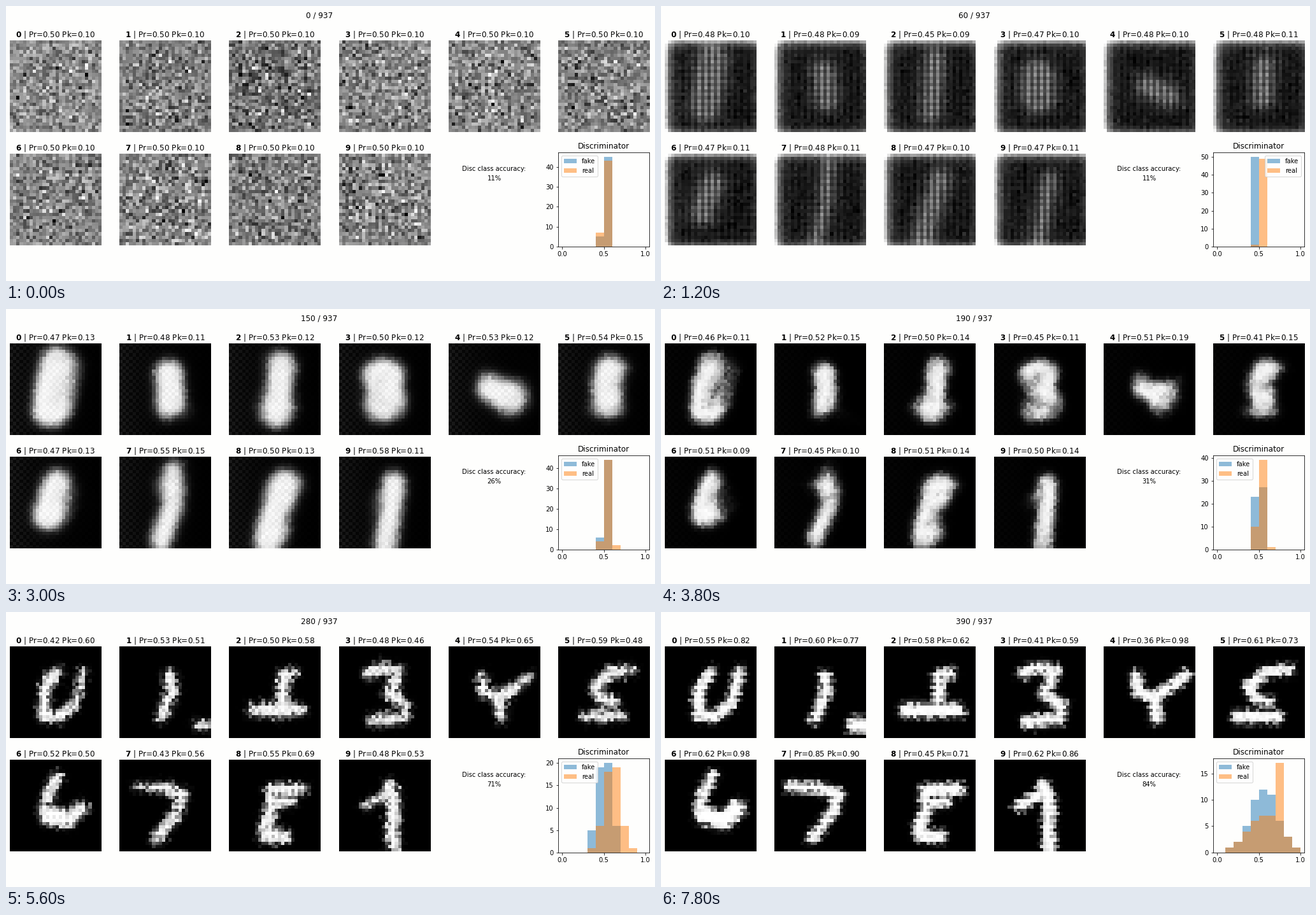
These frames come from a looping animation (1019x432 px, 8 s). A matplotlib script:

```python
import math

import matplotlib.pyplot as plt
import numpy as np
from matplotlib.animation import FuncAnimation

W, H, DPI = 1019, 432, 72
FRAMES, INTERVAL = 40, 200
N = 28
PAPER = "#fefefd"

X, Y = np.meshgrid(np.arange(N) + 0.5, np.arange(N) + 0.5)
ODD_COL, ODD_ROW = X.astype(int) % 2, Y.astype(int) % 2
CHECKER, DOTS = (ODD_COL + ODD_ROW) % 2, ODD_COL * ODD_ROW
RIM = np.minimum.reduce([X, Y, N - X, N - Y])


def bar(radius, *xy):
    """Distance field of a round stroke, positive inside."""
    pts = np.reshape(xy, (-1, 2))
    best = np.full((N, N), 99.0)
    for (ax, ay), (bx, by) in zip(pts[:-1], pts[1:]):
        dx, dy = bx - ax, by - ay
        t = np.clip(((X - ax) * dx + (Y - ay) * dy) / (dx * dx + dy * dy), 0, 1)
        best = np.minimum(best, np.hypot(X - ax - t * dx, Y - ay - t * dy))
    return radius - best


def form(*bars):
    return np.clip(np.maximum.reduce(bars), -5, 3)


# each digit starts as a thick blob and ends as thin strokes
BLOBS = [
    form(bar(6.2, 14.5, 6, 12.5, 20)),
    form(bar(5, 15, 9.5, 16, 18)),
    form(bar(4.6, 15.5, 6, 14.5, 22)),
    form(bar(6.6, 13.5, 11, 13.5, 17)),
    form(bar(4.8, 13.5, 14, 20, 17)),
    form(bar(4.8, 15.5, 8, 15, 17.5)),
    form(bar(5, 14.5, 9, 11.5, 18)),
    form(bar(3.6, 16.5, 4, 15.5, 16, 13, 26)),
    form(bar(4.8, 17, 8, 12, 26)),
    form(bar(3.8, 17, 8, 13.5, 27)),
]
STROKES = [
    form(bar(1.7, 14, 8, 10.5, 13, 10.3, 21, 15, 21.5, 20, 18, 22.8, 8)),
    form(bar(1.7, 15.3, 9, 16, 14, 12.5, 22), bar(2.2, 24.2, 24, 28, 24)),
    form(bar(1.8, 20, 8, 17, 9, 16.5, 17), bar(2.2, 6.8, 19.5, 22.5, 19.5)),
    form(bar(1.8, 9, 8, 13, 6.5, 18.5, 7.5, 15.5, 14.5, 20.5, 18, 20, 22, 10, 23)),
    form(bar(1.7, 10, 9, 10.5, 14, 15.5, 15.5, 25, 9), bar(1.9, 15.5, 15, 16, 22)),
    form(bar(1.7, 23, 7, 16, 8, 11, 12, 13, 16, 17, 17), bar(1.9, 7.5, 21.5, 19.5, 21.5)),
    form(bar(1.7, 14.5, 5, 11.5, 11, 10.5, 15), bar(2.8, 12, 17, 18, 18.5, 22, 15)),
    form(bar(1.7, 5, 8.3, 13, 8.5, 19.5, 10.5, 18, 16, 11.5, 24)),
    form(bar(2, 22.5, 9, 12.5, 9.5, 13, 15, 11, 20, 11, 23, 17, 23.5), bar(1.8, 13, 13, 19, 12.5)),
    form(bar(2, 15, 8, 16.8, 12, 16.5, 22, 17, 27), bar(1.7, 8, 14, 13.5, 11)),
]

KEYS = [0, 6, 11, 19, 24, 33, 39]


def track(*levels):
    """A value that passes through one level per key frame."""
    return lambda frame: float(np.interp(frame, KEYS, levels))


accuracy = track(11, 11, 20, 31, 65, 79, 84)
pr_mean, pr_spread = track(50, 47, 55, 48, 50, 54, 55), track(0, 0.6, 2, 4.5, 3.5, 13, 16)
pk_mean, pk_spread = track(10, 10, 10.5, 13, 27, 87, 80), track(0, 0.8, 1, 3, 7, 6, 14)
fake_mean = track(0.532, 0.45, 0.55, 0.503, 0.517, 0.49, 0.56)
fake_sd = track(0.025, 0.015, 0.015, 0.03, 0.05, 0.122, 0.16)
real_mean = track(0.527, 0.531, 0.557, 0.529, 0.588, 0.62, 0.56)
real_sd = track(0.025, 0.015, 0.0277, 0.0346, 0.0635, 0.118, 0.2)
confident = track(0, 0, 0, 0, 0, 0, 0.26)

settled = track(0, 0, 1, 1, 1, 1, 1)
thinned = track(0, 0, 0, 0.4, 0.75, 1, 1)
shrink = track(0, 0, 0, 0.9, 0.9, 0, 0)
sharpness = track(0.9, 0.9, 0.9, 1.8, 2.6, 2.6, 2.8)
grain = track(0.1, 0.1, 0.1, 0.2, 0.3, 0.6, 0.4)
dot_gap = track(0, 0, 0, 0, 0, 0.7, 0)
row_gap = track(0, 0, 0, 0, 0, 0.1, 0.6)
weave = track(0.11, 0.11, 0.11, 0.02, 0, 0, 0)
fog = track(0.13, 0.13, 0.13, 0.02, 0, 0, 0)


def static(noise):
    v = noise * (1 - 0.4 * np.exp(-RIM / 2))
    return (v - v.min()) / np.ptp(v)


def haze(i, noise):
    v = 0.08 + 0.3 * ((BLOBS[i] + 5) / 8) ** 3
    v *= (1.3 - 0.6 * ODD_COL) * (1.12 - 0.24 * ODD_ROW)
    v += 0.95 * np.exp(-X / 1.4) + 0.75 * np.exp(-Y / 1.1)
    v += 0.4 * np.exp(-(N - Y) / 0.8) + 0.25 * np.exp(-(N - X) / 0.8)
    return v + 0.03 * noise


def ink(i, frame, noise):
    g = thinned(frame)
    field = (1 - g) * BLOBS[i] + g * STROKES[i] - shrink(frame) + grain(frame) * noise
    field += 0.25 - dot_gap(frame) * DOTS - row_gap(frame) * ODD_ROW
    v = 1 / (1 + np.exp(-sharpness(frame) * field))
    v *= 1 - weave(frame) * CHECKER - 0.25 * dot_gap(frame) * DOTS
    return v + fog(frame) * np.exp(-X / 9) * (0.5 + CHECKER)


def picture(i, frame):
    noise = np.random.default_rng(100 * frame + i).normal(size=(N, N))
    t = min(frame / KEYS[1], 1)
    early = (1 - t) * static(noise) + t * haze(i, noise)
    s = settled(frame)
    return np.clip((1 - s) * early + s * ink(i, frame, noise), 0, 1)


# ---- histogram ----
EDGES = np.linspace(0, 1, 11)


def bell(mean, sd):
    cdf = [0.5 + 0.5 * math.erf((e - mean) / sd / math.sqrt(2)) for e in EDGES]
    return 50 * np.diff(cdf)


def counts(frame):
    c = confident(frame)
    real = (1 - c) * bell(real_mean(frame), real_sd(frame)) + c * bell(0.75, 0.025)
    return {"fake": bell(fake_mean(frame), fake_sd(frame)), "real": real}


# ---- layout ----
fig = plt.figure(figsize=(W / DPI, H / DPI), dpi=DPI, facecolor=PAPER)
SIDE, PITCH = 143.4, 172.18


def place(col, y, height):
    x = 6 + PITCH * col
    return fig.add_axes([x / W, 1 - (y + height) / H, SIDE / W, height / H], facecolor=PAPER)


def label(x, y, size, text=""):
    return fig.text(x / W, 1 - y / H, text, size=size, ha="center", va="baseline")


images, titles = [], []
for i in range(10):
    ax = place(i % 6, 54.3 + 178 * (i // 6), SIDE)
    ax.axis("off")
    images.append(ax.imshow(np.zeros((N, N)), cmap="gray", vmin=0, vmax=1,
                            interpolation="nearest", aspect="auto"))
    titles.append(ax.set_title(" "))

hist = place(5, 230.2, 147.6)
counter = label(492, 19, 12)
label(766.6, 259, 10, "Disc class accuracy:")
score = label(766.6, 274, 10)


def draw(frame):
    rng = np.random.default_rng(frame)
    pr = pr_mean(frame) + pr_spread(frame) * rng.normal(size=10)
    pk = pk_mean(frame) + pk_spread(frame) * rng.normal(size=10)
    pr, pk = np.clip([pr, pk], 8, 98) / 100
    for i in range(10):
        images[i].set_data(picture(i, frame))
        titles[i].set_text(rf"$\bf{{{i}}}$ | Pr={pr[i]:.2f} Pk={pk[i]:.2f}")

    hist.clear()
    hist.set_title("Discriminator")
    for name, heights in counts(frame).items():
        hist.hist(EDGES[:-1] + 0.05, EDGES, weights=np.round(heights), alpha=0.5, label=name)
    hist.legend(loc="best")

    counter.set_text(f"{frame * 10} / 937")
    score.set_text(f"{accuracy(frame):.0f}%")
    return images + titles + [counter, score]


anim = FuncAnimation(fig, draw, frames=FRAMES, interval=INTERVAL,
                     init_func=lambda: draw(0), repeat=True, blit=False)
plt.show()
```
